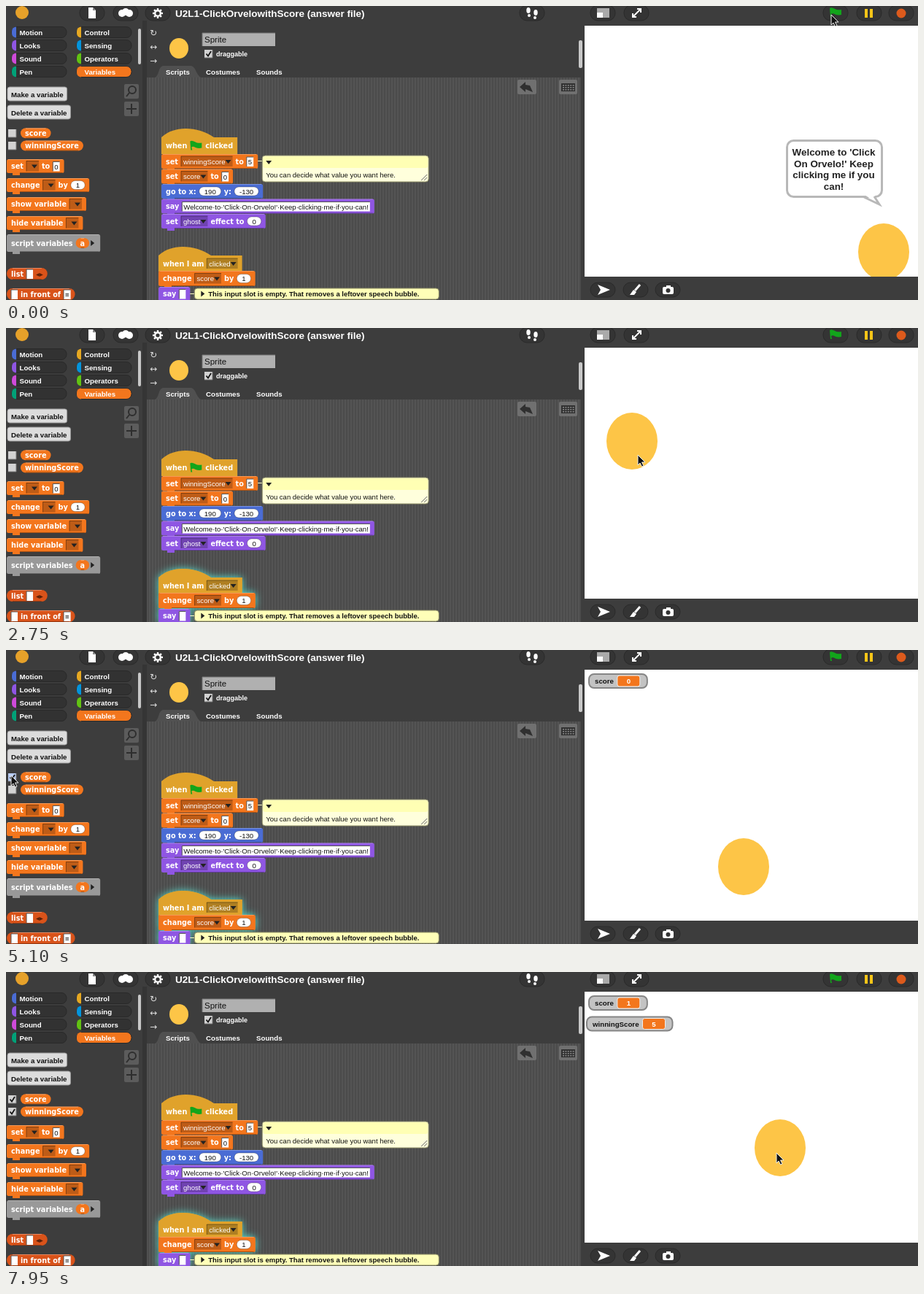
Recreate the animation shown at these times as an HTML page with a canvas. Size 1250 by 403 pixels, loop 8 s.

```html
<!DOCTYPE html>
<html lang="en">
<head>
<meta charset="utf-8">
<title>Block editor demo</title>
<style>
html, body { margin: 0; width: 100%; height: 100%; overflow: hidden; background: #3d3d3d; }
canvas { display: block; }
</style>
</head>
<body>
<canvas id="view" width="1250" height="403"></canvas>
<script>
const g = document.getElementById('view').getContext('2d');
const sans = (size, bold) => `${bold ? 'bold ' : ''}${size}px "Liberation Sans", Arial, sans-serif`;
const BLOCK = 'bold 9.7px "DejaVu Sans", sans-serif';
const ICON = '12px "DejaVu Sans", sans-serif';
const BOLD = sans(9.7, true), PLAIN = sans(9.6);
const ORANGE = '#f3761d', RUST = '#d9531a', PURPLE = '#8f56e3', BLUE = '#4a6cd4', GOLD = '#e0a22b';
const BODY = '#fdc547', DARK = '#343434';

const LOOP = 8000, HOP = 1050, FIRST_HOP = 1850, MOVE = 350;
const SHOW_SCORE = 4150, SHOW_GOAL = 5500;
const clicks = [1800, 2450, 7000, 7850];
const perches = [[1203, 322], [858, 140], [1085, 111], [1025, 188], [1011, 282], [1187, 124], [1061, 226]];
// Each move: start time, then where the pointer goes
const moves = [[-MOVE, 1131, 12], [1100, 1200, 318], [1750, 866, 174], [2950, 7, 172],
  [5150, 8, 190], [6450, 1189, 145], [7570, 1056, 248]];

const hops = t => Math.max(0, Math.floor((t - FIRST_HOP) / HOP) + 1);
const misses = t => Math.min(3, Math.max(0, hops(t) - 2));
const score = t => clicks.filter(c => c <= t).length - misses(t);

function text(s, x, y, font = BLOCK, color = '#fff', align = 'left') {
  g.font = font; g.fillStyle = color; g.textAlign = align;
  g.fillText(s, x, y);
}
function width(s, font = BLOCK) { g.font = font; return g.measureText(s).width; }
function rect(x, y, w, h, color) { g.fillStyle = color; g.fillRect(x, y, w, h); }
function box(x, y, w, h, r, fill, line, weight = 1) {
  g.beginPath(); g.roundRect(x, y, w, h, r);
  g.fillStyle = fill; g.fill();
  if (line) { g.strokeStyle = line; g.lineWidth = weight; g.stroke(); }
}
function poly(points, fill) {
  g.beginPath();
  for (let i = 0; i < points.length; i += 2) g.lineTo(points[i], points[i + 1]);
  g.closePath(); g.fillStyle = fill; g.fill();
}
function line(color, weight, ...p) {
  g.strokeStyle = color; g.lineWidth = weight; g.beginPath();
  for (let i = 0; i < p.length; i += 2) g.lineTo(p[i], p[i + 1]);
  g.stroke();
}
function oval(x, y, rx, ry, color) {
  g.beginPath(); g.ellipse(x, y, rx, ry, 0, 0, 7);
  g.fillStyle = color; g.fill();
}
const down = (x, y) => poly([x - 4, y - 2, x + 4, y - 2, x, y + 3], '#222');
const right = (x, y) => poly([x - 2, y - 4, x + 3, y, x - 2, y + 4], '#222');

function flag(x, y) {
  g.beginPath(); g.moveTo(x - 8, y - 5);
  g.bezierCurveTo(x - 4, y - 8, x, y - 1, x + 8, y - 3); g.lineTo(x + 8, y + 4);
  g.bezierCurveTo(x, y + 6, x - 3, y, x - 6, y + 3); g.lineTo(x - 5, y + 7); g.lineTo(x - 7, y + 7);
  g.fillStyle = '#12a51b'; g.fill();
}

// Block outlines
function slab(x, y, w, h, color) {
  g.beginPath(); g.roundRect(x, y, w, h, 2.5); g.rect(x + 8, y + h - 1, 10, 4);
  g.fillStyle = color; g.fill();
  rect(x + 2, y, w - 4, 1, '#ffffff40');
  rect(x + 18, y + h - 1, w - 20, 1, '#00000050');
}
function pill(x, y, w, h, color) {
  box(x, y, w, h, h / 2, color);
  line('#ffffff50', 1, x + h / 2, y + .5, x + w - h / 2, y + .5);
  line('#00000050', 1, x + h / 2, y + h - .5, x + w - h / 2, y + h - .5);
}
function hat(x, y, w, h, color) {
  g.beginPath(); g.moveTo(x, y);
  g.bezierCurveTo(x + 18, y - 17, x + 50, y - 15, x + 72, y);
  g.lineTo(x + w, y); g.lineTo(x + w, y + h); g.lineTo(x, y + h);
  g.fillStyle = color; g.fill();
}

// Block parts: a width, and a way to draw at a left edge and a middle line
const label = (s, color) => ({ w: width(s), draw: (x, y) => text(s, x, y + 3.7, BLOCK, color) });
const part = (w, draw) => ({ w, draw: (x, y) => draw(x, y, w) });
const menu = (s = '') => part(Math.max(17, width(s, PLAIN) + 13), (x, y, w) => {
  rect(x, y - 7, w, 14, '#00000038');
  line('#0006', 1, x, y + 7, x, y - 7, x + w, y - 7);
  text(s, x + 3, y + 3.5, PLAIN); down(x + w - 6, y);
});
const slot = (s = '') => part(Math.max(9, width(s, PLAIN) + 4), (x, y, w) => {
  rect(x, y - 6, w, 13, '#fff');
  line('#555', 1, x, y + 7, x, y - 6, x + w, y - 6);
  text(s, x + w / 2, y + 4, PLAIN, '#111', 'center');
});
const number = s => part(width(s, PLAIN) + 14, (x, y, w) => {
  box(x, y - 6, w, 12, 6, '#fff', '#0004');
  text(s, x + w / 2, y + 3.5, PLAIN, '#111', 'center');
});
const variable = s => part(width(s) + 12, (x, y, w) => {
  pill(x, y - 7, w, 14, ORANGE); text(s, x + 6, y + 3.7);
});
const greenFlag = () => part(17, (x, y) => flag(x + 8, y - 1));
const arrow = () => part(5, right);

// Lays the parts in a row inside a block; returns its right edge
function block(shape, x, y, h, color, ...content) {
  const parts = content.map(p => typeof p === 'string' ? label(p) : p);
  const w = parts.reduce((sum, p) => sum + p.w + 4, 8);
  shape(x, y, w, h, color);
  let at = x + 6;
  for (const p of parts) { p.draw(at, y + h / 2); at += p.w + 4; }
  return x + w;
}

function topBar() {
  for (const x of [118, 164, 208, 721, 818, 864, 1137, 1183, 1227])
    box(x - 17, -1, 34, 21, 10, DARK, '#2a2a2a');
  oval(22, 9, 9, 9, '#e6a12a');
  poly([113, 2, 119, 2, 123, 6, 123, 17, 113, 17], '#fff');
  poly([119, 2, 119, 6, 123, 6], '#888');
  for (const dx of [-5, 0, 5]) oval(164 + dx, 10 - (dx ? 0 : 2), 5, 5, '#fff');
  for (let i = 0; i < 8; i++) {
    const c = Math.cos(i * Math.PI / 4), s = Math.sin(i * Math.PI / 4);
    line('#fff', 2.4, 208 + 3 * c, 10 + 3 * s, 208 + 7 * c, 10 + 7 * s);
  }
  oval(208, 10, 5, 5, '#fff'); oval(208, 10, 2.6, 2.6, DARK);
  for (const i of [0, 1]) {
    oval(716 + i * 10, 6 + i * 3, 2.7, 4, '#fff');
    oval(717 + i * 8, 13 + i * 3, 2, 2, '#fff');
  }
  rect(810, 3, 17, 13, '#aaa'); rect(810, 9, 8, 7, '#fff');
  line('#fff', 2, 859, 15, 870, 4);
  line('#fff', 2, 865, 4, 870, 4, 870, 9); line('#fff', 2, 859, 10, 859, 15, 864, 15);
  flag(1137, 8);
  rect(1177, 4, 4, 12, '#f5c518'); rect(1184, 4, 4, 12, '#f5c518');
  oval(1227, 10, 6.5, 6.5, '#dc5a1c');
  text('U2L1-ClickOrvelowithScore (answer file)', 232, 15, sans(13.5, true));
}

function categories() {
  const colors = {
    Motion: BLUE, Looks: PURPLE, Sound: '#cf4ad9', Pen: '#00a178',
    Control: '#e6a822', Sensing: '#0494dc', Operators: '#62c213', Variables: ORANGE
  };
  Object.entries(colors).forEach(([name, color], i) => {
    const x = i < 4 ? 8 : 97, y = 28.5 + i % 4 * 18;
    box(x, y, 75, 15, 7, name === 'Variables' ? ORANGE : '#323232', '#292929');
    box(x, y, 6, 15, [7, 0, 0, 7], color);
    text(name, x + 10.5, y + 11, BOLD);
  });
  box(181, 31, 4, 49, 2, '#c8c8c8');
}

function checkbox(x, y, on, hover) {
  rect(x, y, 11, 11, hover ? '#b9cdf3' : '#d2d2d2');
  line('#777', 1, x, y + 11, x + 11, y + 11, x + 11, y);
  if (on) line('#111', 1.7, x + 2.5, y + 5.5, x + 5, y + 8.5, x + 9, y + 2);
}

function palette(t) {
  ['Make a variable', 'Delete a variable'].forEach((s, i) => {
    box(2, 111 + 25 * i, width(s, BOLD) + 10, 19, 3, '#dcdcdc', '#999');
    text(s, 7, 124.5 + 25 * i, BOLD, '#111');
    box(162, 107 + 24 * i, 20, 20, 2, '#5c5c5c');
  });
  g.beginPath(); g.arc(173, 115, 5, 0, 7); g.strokeStyle = '#2e2e2e'; g.lineWidth = 2; g.stroke();
  line('#2e2e2e', 2, 169, 119, 165, 124);
  line('#2e2e2e', 2, 172, 134, 172, 148); line('#2e2e2e', 2, 165, 141, 179, 141);

  checkbox(3, 169, t >= SHOW_SCORE, t >= 3200 && t < 5250);
  checkbox(3, 186, t >= SHOW_GOAL, t >= 5300 && t < 6550);
  variable('score').draw(20, 174.3); variable('winningScore').draw(20, 191.5);

  const rows = [['set', menu(), 'to', slot('0')], ['change', menu(), 'by', number('1')],
    ['show variable', menu()], ['hide variable', menu()]];
  rows.forEach((parts, i) => block(slab, 1, 210 + 26 * i, 19, ORANGE, ...parts));
  block(slab, 1, 313, 24, '#999', 'script variables', variable('a'), arrow());
  block(pill, 1, 359, 16, RUST, 'list', slot(), label('◂▸', '#5a2008'));
  block(pill, 1, 387, 16, RUST, slot(), 'in front of', slot('≡'));
}

function spriteBar() {
  ['↻', '↔', '→'].forEach((s, i) => text(s, 202, 41 + 19 * i, ICON, '#ddd', 'center'));
  oval(237, 58, 13, 14, BODY);
  rect(269, 37, 100, 18, '#b0b0b0');
  line('#777', 1, 269, 55, 269, 37, 369, 37);
  text('Sprite', 272, 50, sans(11.5), '#111');
  checkbox(272, 60, true); text('draggable', 288, 69, sans(9, true));
  box(785, 47, 5, 38, 2, '#c8c8c8');
  g.beginPath(); g.moveTo(202, 99);
  g.bezierCurveTo(211, 97, 208, 82, 216, 82); g.lineTo(253, 82);
  g.bezierCurveTo(261, 82, 260, 97, 270, 99); g.fillStyle = '#505050'; g.fill();
  text('Scripts', 219, 94, BOLD); text('Costumes', 274, 94, BOLD); text('Sounds', 343, 94, BOLD);
}

function scriptPane() {
  rect(193, 98, 595, 305, '#545454');
  for (let x = 194; x < 788; x += 4) rect(x, 98, 2, 305, '#4b4b4b');
  box(701, 101, 26, 20, 2, '#707070'); box(758, 101, 25, 20, 2, '#707070');
  poly([704, 111, 712, 104, 712, 108, 718, 109, 722, 118, 712, 114, 712, 118], '#303030');
  rect(761, 106, 19, 11, '#303030');
  for (let i = 0; i < 15; i++) rect(763 + i % 5 * 3.4, 108 + (i / 5 | 0) * 3, 2, 1.5, '#8a8a8a');
}

function note(edge, y, w, h, color) {
  line('#ffffc4', 1, edge, y + 7.5, edge + 6, y + 7.5);
  box(edge + 6, y, w, h, 4, color, '#8c8c66');
  return edge + 6;
}

function firstScript() {
  const hello = "Welcome·to·'Click·On·Orvelo!'·Keep·clicking·me·if·you·can!";
  const rows = [
    [ORANGE, 'set', menu('winningScore'), 'to', slot('5')],
    [ORANGE, 'set', menu('score'), 'to', slot('0')],
    [BLUE, 'go to x:', number('190'), 'y:', number('-130')],
    [PURPLE, 'say', slot(hello)],
    [PURPLE, 'set', menu('ghost'), 'effect to', number('0')]
  ];
  block(hat, 213, 180, 23, GOLD, 'when', greenFlag(), 'clicked');
  const edges = rows.map((row, i) => block(slab, 213, 203 + 20.5 * i, 20, ...row));
  const x = note(edges[0], 205, 228, 36, '#ffffdc');
  box(x + 1, 206, 226, 16, 3, '#ffffb4');
  down(x + 9, 214);
  text('You can decide what value you want here.', x + 5, 235, sans(9.5), '#111');
  for (const d of [4, 8]) line('#666', 1, x + 226 - d, 239, x + 226, 239 - d);
}

function secondScript() {
  block(hat, 209, 342, 22, GOLD, 'when I am', menu('clicked'));
  block(slab, 209, 363, 21, ORANGE, 'change', menu('score'), 'by', number('1'));
  return block(slab, 209, 385, 19, PURPLE, 'say', slot());
}

function scripts(t) {
  firstScript();
  if (t >= clicks[0]) {
    g.save(); g.shadowColor = '#5ce0d0'; g.shadowBlur = 11;
    secondScript(); g.restore();
  }
  const x = note(secondScript(), 387, 335, 15, '#ffffb8');
  right(x + 11, 394.5);
  text('This input slot is empty. That removes a leftover speech bubble.', x + 19, 398, sans(9.5, true), '#111');
}

function watcher(x, y, name, value) {
  const at = x + 13 + width(name, BOLD);
  box(x, y, at + 41 - x, 19, 7, '#c3c3c3', '#858585', 2);
  text(name, x + 8, y + 13, BOLD, '#111');
  box(at, y + 2, 31, 15, 3, ORANGE, '#eee');
  text(value, at + 15.5, y + 13, BOLD, '#fff', 'center');
}

function bubble() {
  box(1070.5, 184.5, 130, 77, 9, '#fff', '#b8b8b8', 3);
  poly([1177, 259, 1190, 259, 1197, 272], '#fff');
  line('#b8b8b8', 3, 1176, 262, 1197, 272, 1190, 261);
  ["Welcome to 'Click", "On Orvelo!' Keep", 'clicking me if you', 'can!'].forEach((s, i) =>
    text(s, 1134.5, 205 + i * 15.7, sans(13.4, true), '#222', 'center'));
}

function stage(t) {
  g.save(); g.beginPath(); g.rect(793, 27, 457, 344); g.clip();
  rect(793, 27, 457, 344, '#fff');
  const [x, y] = perches[hops(t)];
  oval(x, y + 15, 35, 39, BODY);
  if (t < clicks[0]) bubble();
  if (t >= SHOW_SCORE) watcher(799, 33, 'score', score(t));
  if (t >= SHOW_GOAL) watcher(796, 61.5, 'winningScore', 5);
  g.restore();
}

function corral() {
  for (const x of [818, 863, 907]) box(x - 17, 379, 34, 20, 10, DARK, '#2a2a2a');
  poly([811, 382, 828, 389, 811, 396, 815, 389], '#fff');
  line('#fff', 3, 869, 382, 862, 390);
  poly([860, 389, 864, 392, 861, 396, 855, 396], '#fff');
  box(900, 385, 15, 10, 2, '#fff'); rect(905, 383, 6, 3, '#fff');
  oval(907.5, 390, 3, 3, DARK);
}

function cursor(t) {
  const i = moves.filter(m => m[0] <= t).length - 1;
  const [start, x1, y1] = moves[i], [, x0, y0] = moves[Math.max(0, i - 1)];
  const u = Math.min(1, (t - start) / MOVE), e = u * u * (3 - 2 * u);
  g.save(); g.translate(x0 + (x1 - x0) * e, y0 + (y1 - y0) * e);
  poly([0, 0, 0, 14, 3, 11, 5.5, 16, 8, 15, 5.5, 10, 10, 10], '#111');
  g.strokeStyle = '#eee'; g.lineWidth = 1; g.stroke();
  g.restore();
}

function frame(now) {
  const t = now % LOOP;
  rect(0, 0, 1250, 403, '#3d3d3d');
  rect(187, 20, 6, 383, '#353535');
  topBar(); categories(); palette(t); spriteBar();
  scriptPane(); scripts(t);
  stage(t); corral(); cursor(t);
  requestAnimationFrame(frame);
}
requestAnimationFrame(frame);
</script>
</body>
</html>
```
